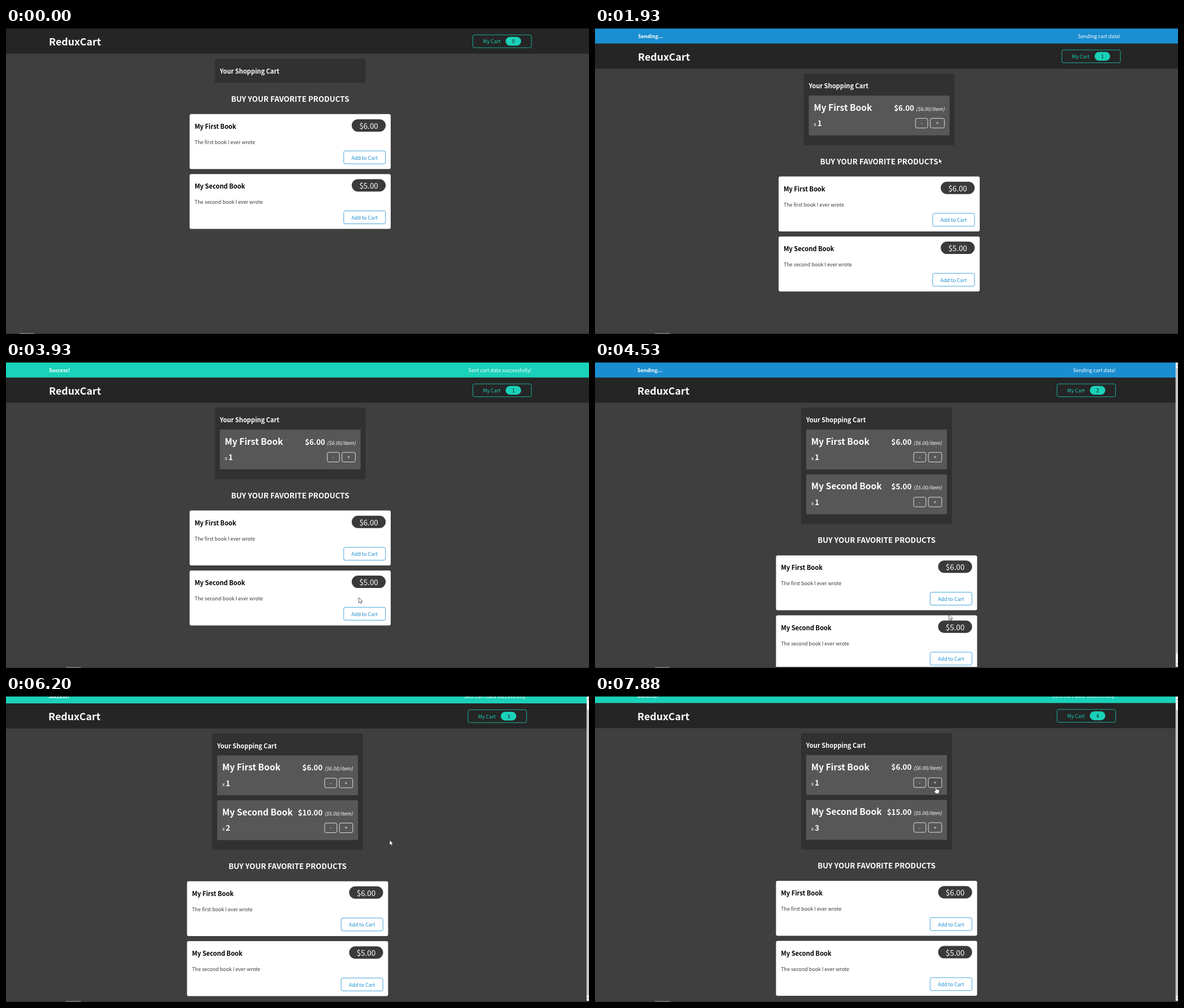
These frames come from a looping animation (1032x543 px, 8000 ms). An HTML page:

```html
<!DOCTYPE html>
<html lang="en">
<head>
<meta charset="utf-8">
<title>Shopping cart</title>
<style>
  html, body { margin: 0; width: 100%; height: 100%; overflow: hidden; background: #3f3f3f; }
  svg { display: block; width: 100vw; height: 100vh; font-family: "Noto Sans CJK JP", "Noto Sans CJK SC", "Noto Sans CJK", sans-serif; }
</style>
</head>
<body>
<svg id="stage" viewBox="0 0 1032 543"></svg>
<script>
const LOOP = 8000, REM = 8.9, VIEW_TOP = 1, VIEW_BOTTOM = 541;
const BLUE = '#1a8ed1', TEAL = '#1ad1b9';
const stage = document.getElementById('stage');

// Each click sends the cart: [click time, success time]
const REQUESTS = [[1720, 2190], [4400, 4670], [5600, 5660], [7420, 7540]];

// Pointer keys: time, x, y
const POINTER = [
  [0, 1008, 545], [70, 998, 535], [350, 774.5, 364.5], [850, 774.5, 364.5],
  [1440, 608.5, 231], [2190, 608.5, 231], [2860, 622, 275], [3530, 620, 350],
  [3880, 620, 350], [3930, 624.5, 418], [4200, 626.5, 448.5], [4620, 626.5, 448.5],
  [5200, 601.5, 242], [5460, 603.5, 248.7], [5830, 603.5, 248.7], [6180, 679, 255.5],
  [6230, 679, 255.5], [6620, 613, 233.5], [6820, 603.5, 232.3], [7540, 603.5, 232.3],
  [7870, 603.5, 161.3], [LOOP, 603.5, 161.3]
];

const smooth = p => { p = Math.min(1, Math.max(0, p)); return p * p * (3 - 2 * p); };

function pointerAt(t) {
  const i = POINTER.findIndex(key => key[0] > t);
  const [t0, x0, y0] = POINTER[i - 1], [t1, x1, y1] = POINTER[i];
  const p = smooth((t - t0) / (t1 - t0));
  return { x: x0 + (x1 - x0) * p, y: y0 + (y1 - y0) * p };
}

const rect = (x, y, w, h, fill, r = 0, extra = '') =>
  `<rect x="${x}" y="${y}" width="${w}" height="${h}" rx="${r}" fill="${fill}" ${extra}/>`;

const text = (x, y, rem, str, fill = '#fff', extra = '') =>
  `<text x="${x}" y="${y}" font-size="${rem * REM}" fill="${fill}" ${extra}>${str}</text>`;

const BOLD = 'font-weight="700"', MIDDLE = 'text-anchor="middle"', END = 'text-anchor="end"';

function scene(t) {
  const pointer = pointerAt(t);
  let hovering = false;

  const request = REQUESTS.filter(r => t >= r[0]).pop();
  const clicks = REQUESTS.filter(r => t >= r[0]).length;
  const quantities = [Math.min(clicks, 1), Math.max(clicks - 1, 0)];
  const rows = quantities.filter(Boolean).length;
  const scrollbar = rows > 1;
  const scroll = 15.1 * smooth((t - 5990) / 240);

  // The scrollbar narrows the page, which moves each alignment differently
  const [left, mid, right] = scrollbar ? [75, 498.4, 921.7] : [76, 503, 930.2];

  function button(x, y, w, h, label, baseline, color, hover) {
    const over = pointer.x >= x && pointer.x <= x + w && pointer.y >= y && pointer.y <= y + h;
    hovering = hovering || over;
    return rect(x, y, w, h, over ? hover.fill : 'none', 2.8, `stroke="${color}" stroke-width=".8"`) +
      text(x + w / 2, y + baseline, 1, label, over ? hover.text : color, MIDDLE);
  }

  function banner(y) {
    const sending = t < request[1];
    return rect(0, y, 1032, 26.8, sending ? BLUE : TEAL) +
      text(left, y + 17.3, 1, sending ? 'Sending...' : 'Success!', '#fff', BOLD) +
      text(right, y + 17.3, 1, sending ? 'Sending cart data!' : 'Sent cart data successfully!', '#fff', END);
  }

  function header(y) {
    return rect(0, y, 1032, 44.5, '#252525') +
      text(left, y + 30, 2, 'ReduxCart', '#fff', BOLD) +
      rect(right - 103.8, y + 11.2, 103.6, 22.8, 'none', 2.8, `stroke="${TEAL}" stroke-width=".8"`) +
      text(right - 86, y + 26.4, 1, 'My Cart', TEAL) +
      rect(right - 45.8, y + 14.7, 27.4, 15.6, TEAL, 7.8) +
      text(right - 32.1, y + 26.4, 1, clicks, '#1d1d1d', MIDDLE);
  }

  function cartRow(y, name, price, quantity) {
    const x = mid - 124.6, end = mid + 115.7;
    const inset = t < 2190 ? 1.3 : 0;
    const hover = { fill: '#4b4b4b', text: '#fff' };
    return rect(x, y, 249.2, 70.7, '#575757') +
      text(x + REM, y + 26.8, 1.75, name, '#fff', BOLD) +
      text(end, y + 26.6, 1.5,
        `<tspan ${BOLD}>$${price * quantity}.00 </tspan><tspan font-size="${REM}" font-style="italic">($${price}.00/item)</tspan>`,
        '#fff', END) +
      text(x + REM, y + 54.4, 1, `x <tspan font-size="${1.5 * REM}" ${BOLD}>${quantity}</tspan>`) +
      button(end - 50 - inset, y + 40.4, 21.6, 17.1, '-', 11.7, '#fff', hover) +
      button(end - 24 - inset, y + 40.4, 23.7 + inset, 17.1, '+', 11.7, '#fff', hover);
  }

  function product(y, name, ordinal, price) {
    const x = mid - 178, end = mid + 169.1;
    return rect(x, y, 356, 97.4, '#fff', 3) +
      text(x + REM, y + 26, 1.25, name, '#000', BOLD) +
      rect(end - 60.1, y + 9.1, 60.1, 22, '#3a3a3a', 11) +
      text(end - 30, y + 26, 1.5, `$${price}.00`, '#fff', MIDDLE) +
      text(x + REM, y + 53.2, 1, `The ${ordinal} book I ever wrote`, '#3a3a3a') +
      button(end - 74.3, y + 65.3, 74, 22.9, 'Add to Cart', 15.4, BLUE, { fill: BLUE, text: '#fff' });
  }

  let y = VIEW_TOP - scroll, page = '';
  if (request) { page += banner(y); y += 26.7; }
  page += header(y);
  y += 53.4;

  const cartHeight = 42.9 + (rows ? 4.5 + 79.6 * rows : 0);
  page += rect(mid - 133.5, y, 267, cartHeight, '#313131', 3.3) +
    text(mid - 124.6, y + 26.1, 1.25, 'Your Shopping Cart', '#fff', BOLD);
  if (quantities[0]) page += cartRow(y + 38.8, 'My First Book', 6, quantities[0]);
  if (quantities[1]) page += cartRow(y + 118.4, 'My Second Book', 5, quantities[1]);
  y += cartHeight;

  page += text(mid, y + 33.6, 1.5, 'BUY YOUR FAVORITE PRODUCTS', '#fff', BOLD + MIDDLE.replace(/^/, ' ')) +
    product(y + 55.5, 'My First Book', 'first', 6) +
    product(y + 161.9, 'My Second Book', 'second', 5);

  if (scrollbar) {
    page += rect(1027.8, VIEW_TOP, 10, 540, '#f1f1f1') +
      rect(1028.6, 10.5 + scroll * .95, 8, 507, '#c1c1c1') +
      '<path d="M1030 7l2.5-2.5 2.5 2.5zM1030 535l2.5 2.5 2.5-2.5z" fill="#505050"/>';
  }

  const cursor = hovering
    ? 'M-1.1 .8C-1-.4 1-.4 1.1 .8V4.2L5.2 5Q6.4 5.4 6.2 6.8L5.6 9.5 4.8 12H-.4L-3.3 7.8Q-4 6.4-2.6 6.3L-1.1 7.6Z'
    : 'M0 0V9.4L2.2 7.4 3.6 10.6 5.1 9.9 3.8 6.8H6.7Z';

  return `<clipPath id="view">${rect(0, VIEW_TOP, 1032, VIEW_BOTTOM - VIEW_TOP, '#000')}</clipPath>` +
    rect(0, 0, 1032, 543, '#3f3f3f') +
    `<g clip-path="url(#view)">${page}</g>` +
    rect(0, 0, 1032, VIEW_TOP, '#050505') +
    rect(0, VIEW_BOTTOM, 1032, 2, '#363636') +
    rect(request ? 106 : 24, VIEW_BOTTOM, 26.5, 2, '#6c6c6c') +
    `<path d="${cursor}" transform="translate(${pointer.x} ${pointer.y})" fill="#fff" stroke="#000" stroke-width=".6"/>`;
}

let shown = '';
function frame() {
  const next = scene(performance.now() % LOOP);
  if (next !== shown) stage.innerHTML = shown = next;
  requestAnimationFrame(frame);
}
frame();
</script>
</body>
</html>
```
